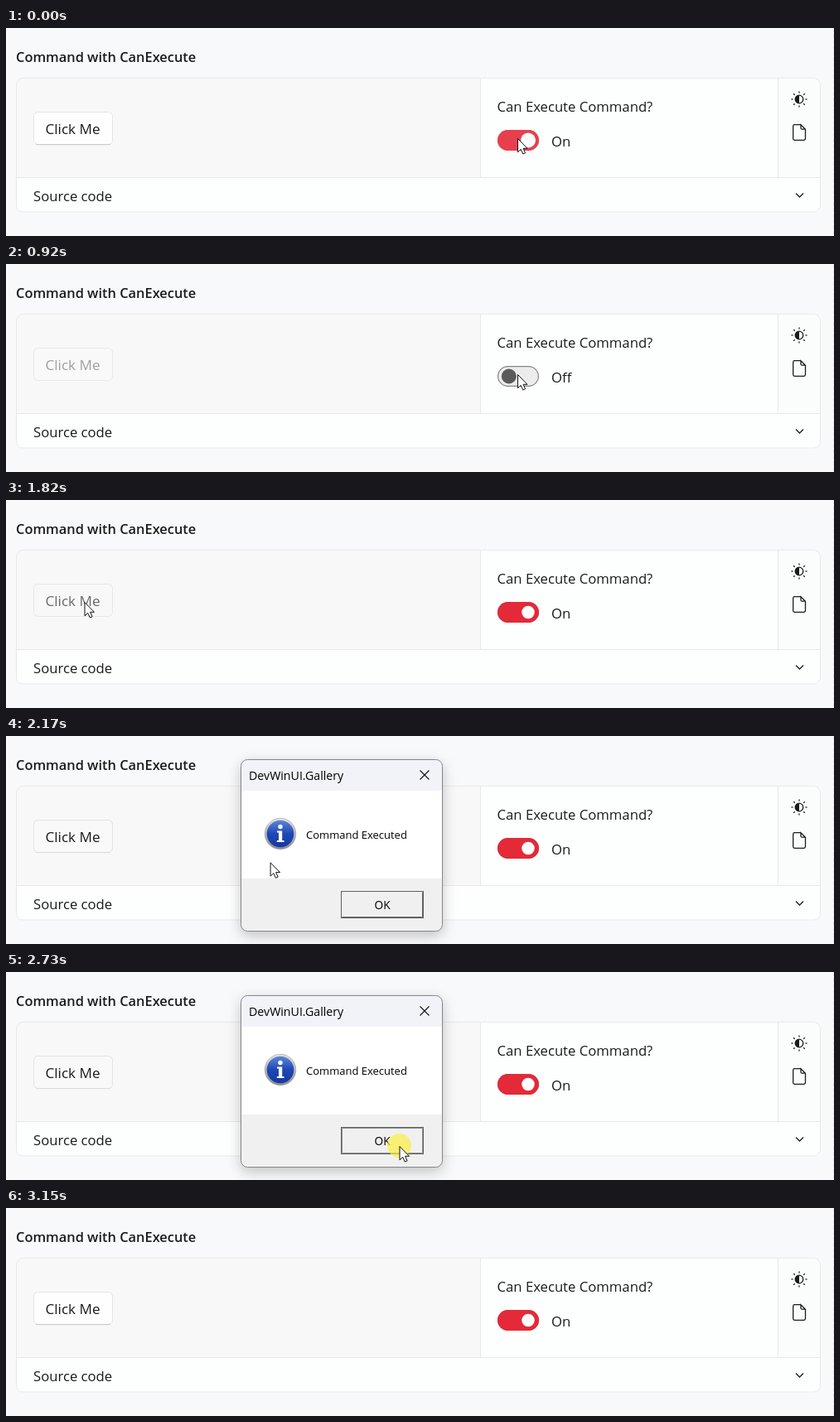
Animation of 999 by 251 pixels, one loop 3280 ms. Source, as an HTML page:

```html
<!DOCTYPE html>
<html lang="en">
<head>
<meta charset="utf-8">
<title>Command with CanExecute</title>
<style>
  html, body { margin: 0; width: 100%; height: 100%; overflow: hidden; background: #f8f9fb; }
  svg { display: block; }
  text { font: 16.7px "Open Sans", "Noto Sans", sans-serif; fill: #1b1b1b; }
  .heading { font-size: 16.4px; font-weight: 600; }
  .line { fill: none; stroke: #e9e9e9; }
  .icon { fill: none; stroke: #1b1b1b; stroke-width: 1.3; }
  #dialog { filter: drop-shadow(0 5px 8px rgba(0, 0, 0, .22)); transform-origin: 405px 132px; }
  #dialog text { fill: #000; }
</style>
</head>
<body>
<svg width="999" height="251" viewBox="0 0 999 251">
  <defs>
    <clipPath id="panelClip"><rect x="12" y="60" width="971" height="162" rx="8"/></clipPath>
    <clipPath id="dialogClip"><rect x="284" y="28.5" width="242" height="207" rx="8"/></clipPath>
    <linearGradient id="blue" x2="0" y2="1">
      <stop offset="0" stop-color="#5c86d8"/><stop offset=".5" stop-color="#1d48b5"/><stop offset="1" stop-color="#1738a0"/>
    </linearGradient>
    <linearGradient id="silver" x2="0" y2="1">
      <stop offset="0" stop-color="#e2e2e2"/><stop offset="1" stop-color="#8c8c8c"/>
    </linearGradient>
  </defs>

  <path d="M998.5 0V251" stroke="#e4e4e6" stroke-dasharray="5 2"/>
  <text class="heading" x="12" y="41">Command with CanExecute</text>

  <g clip-path="url(#panelClip)">
    <path d="M12 60H573V181H12Z" fill="#f8f8f8"/>
    <path d="M573 60H983V222H12V181H573Z" fill="#fdfefe"/>
    <path d="M932 60H983V181H932Z" fill="#fbfcfc"/>
  </g>
  <path class="line" d="M572.5 61V180M931.5 61V180M13 180.5H982"/>
  <rect class="line" x="12.5" y="60.5" width="970" height="161.5" rx="8"/>
  <text x="33" y="209">Source code</text>
  <path class="icon" d="M953 199.5l4.5 4.5l4.5-4.5"/>

  <circle class="icon" cx="957" cy="86" r="4.8"/>
  <path d="M957 81.2a4.8 4.8 0 0 0 0 9.6z" fill="#1b1b1b"/>
  <g id="rays"></g>
  <path class="icon" d="M959 116.7h-7.5q-1.8 0-1.8 1.8v15q0 1.8 1.8 1.8h11.2q1.8 0 1.8-1.8v-11.3l-5.5-5.5v4q0 1.5 1.5 1.5h4"/>

  <rect id="button" x="33.5" y="101.5" width="95" height="39" rx="5"/>
  <path id="edge" d="M36 140.2Q37 140.7 38.5 140.7H123.5Q125 140.7 126 140.2" fill="none" stroke="#c6c6c6"/>
  <text id="label" x="47.5" y="128" style="font-size:17.1px">Click Me</text>

  <text x="592.5" y="101">Can Execute Command?</text>
  <rect x="593.6" y="123.6" width="48.8" height="23.8" rx="11.9" fill="#ececec" stroke="#868686" stroke-width="1.2"/>
  <rect id="track" x="593" y="123" width="50" height="25" rx="12.5"/>
  <rect id="knob"/>
  <text id="state" x="658" y="143"></text>

  <g id="dialog">
    <g clip-path="url(#dialogClip)">
      <path d="M284 28H526V66H284Z" fill="#f2f3f9"/>
      <path d="M284 66H526V172H284Z" fill="#fff"/>
      <path d="M284 172H526V236H284Z" fill="#f0f0f0"/>
    </g>
    <rect x="283.5" y="28.5" width="243" height="207" rx="8" fill="none" stroke="#85868a"/>
    <text x="293" y="53" style="font-size:14.2px">DevWinUI.Gallery</text>
    <path class="icon" d="M499.5 41.5l11 11m0-11l-11 11"/>
    <circle cx="331" cy="118" r="18.8" fill="url(#silver)" stroke="#999" stroke-width=".6"/>
    <circle cx="331" cy="118" r="16.3" fill="url(#blue)"/>
    <circle cx="331" cy="109.5" r="2.7" fill="#fff"/>
    <path d="M327 114.5H333.2V126H335.5V128H326.8V126H329V116.5H327Z" fill="#fff"/>
    <text x="362" y="124" style="font-size:13px">Command Executed</text>
    <rect x="404.5" y="187.5" width="99" height="32" fill="#f0f0f0" stroke="#606060"/>
    <path id="bevel" d="M405.5 218.5H502.5V188.5" fill="none" stroke="#606060"/>
    <path id="pressed" d="M405.5 188.5H502.5V218.5H405.5Z" fill="none" stroke="#8a8a8a"/>
    <text x="444.5" y="209" style="font-size:13.7px">OK</text>
  </g>

  <circle id="flash" r="14.5" fill="#fbf03a" fill-opacity=".68"/>
  <path id="cursor" d="M.5 .5V16.8L4.2 13.4L6.8 19L9.6 17.8L7.1 12.3H12Z" fill="#fff" stroke="#111"/>
</svg>
<script>
const LOOP = 3280;
const $ = id => document.getElementById(id);
const set = (id, attrs) => { for (const k in attrs) $(id).setAttribute(k, attrs[k]); };
const ramp = (t, a, b) => Math.min(1, Math.max(0, (t - a) / (b - a)));
const ease = x => 1 - (1 - x) ** 3;
const within = (t, a, b) => t >= a && t < b;

// Pointer path: time, x, y
const path = [
  [0, 617, 133], [1200, 617, 133], [1270, 594, 126], [1340, 505, 98], [1410, 390, 87],
  [1480, 270, 93], [1550, 170, 109], [1620, 114, 119], [1690, 94.5, 123], [2020, 94.5, 123],
  [2100, 205, 134], [2170, 317.5, 152], [2240, 395, 172], [2310, 438, 190], [2380, 462, 202],
  [2520, 474.5, 210], [3010, 474.5, 210], [3080, 535, 228], [3150, 562, 256], [LOOP, 562, 256]
];
const clicks = [[130, 270], [990, 1130], [1690, 1780], [2660, 2800]];

const looks = {
  normal: ['#fefefe', '#e5e5e5', '#1b1b1b'],
  hover: ['#f9f9f9', '#e3e3e3', '#1b1b1b'],
  pressed: ['#f8f8f8', '#e7e7e7', '#6b6b6b'],
  disabled: ['#f9f9fa', '#e8e8e8', '#a0a0a0']
};
const phases = [[270, 'normal'], [1130, 'disabled'], [1620, 'normal'], [1750, 'hover'],
  [1960, 'pressed'], [2870, 'hover'], [LOOP, 'normal']];

$('rays').innerHTML = Array.from({ length: 8 }, (_, i) =>
  `<path class="icon" d="M957 78.5v-2" transform="rotate(${i * 45} 957 86)"/>`).join('');

function pointer(t) {
  const i = path.findIndex(p => t < p[0]);
  const [t0, x0, y0] = path[i - 1], [t1, x1, y1] = path[i];
  const f = (t - t0) / (t1 - t0);
  return [x0 + (x1 - x0) * f, y0 + (y1 - y0) * f];
}

function drawToggle(t) {
  const on = 1 - ease(ramp(t, 270, 460)) + ease(ramp(t, 1130, 1260));
  const hover = 1 - ramp(t, 1400, 1480);
  const press = within(t, 130, 270) || within(t, 990, 1130) ? 4 : 0;
  const size = 15.5 + 2.5 * hover, width = size + press;
  const shade = Math.round(90 + 165 * on);
  set('track', { opacity: on, fill: `rgb(${228 + 4 * hover},${41 + 22 * hover},${56 + 22 * hover})` });
  set('knob', {
    x: 606.8 + 23.2 * on - width / 2 + press * (.5 - on), y: 135.5 - size / 2,
    width, height: size, rx: size / 2, fill: `rgb(${shade},${shade},${shade})`
  });
  $('state').textContent = within(t, 270, 1130) ? 'Off' : 'On';
}

function drawButton(t) {
  const name = phases.find(p => t < p[0])[1];
  const [fill, stroke, ink] = looks[name];
  set('button', { fill, stroke });
  set('edge', { opacity: name === 'normal' ? 1 : name === 'hover' ? .35 : 0 });
  $('label').style.fill = ink;
}

function drawDialog(t) {
  const show = ramp(t, 1880, 1960) * (1 - ramp(t, 2850, 2940));
  const down = within(t, 2590, 2850);
  $('dialog').style.opacity = show;
  $('dialog').style.transform = `scale(${.93 + .07 * show})`;
  $('dialog').style.display = show ? '' : 'none';
  set('bevel', { opacity: down ? 0 : 1 });
  set('pressed', { opacity: down ? 1 : 0 });
}

function frame(now) {
  const t = now % LOOP;
  const [x, y] = pointer(t);
  drawToggle(t);
  drawButton(t);
  drawDialog(t);
  set('cursor', { transform: `translate(${x} ${y})` });
  set('flash', { cx: x, cy: y - .5, opacity: clicks.some(([a, b]) => within(t, a, b)) ? 1 : 0 });
  requestAnimationFrame(frame);
}
const start = performance.now();
(function tick() {
  const loop = frame;
  loop(Math.max(0, performance.now() - start));
})();
</script>
</body>
</html>
```
